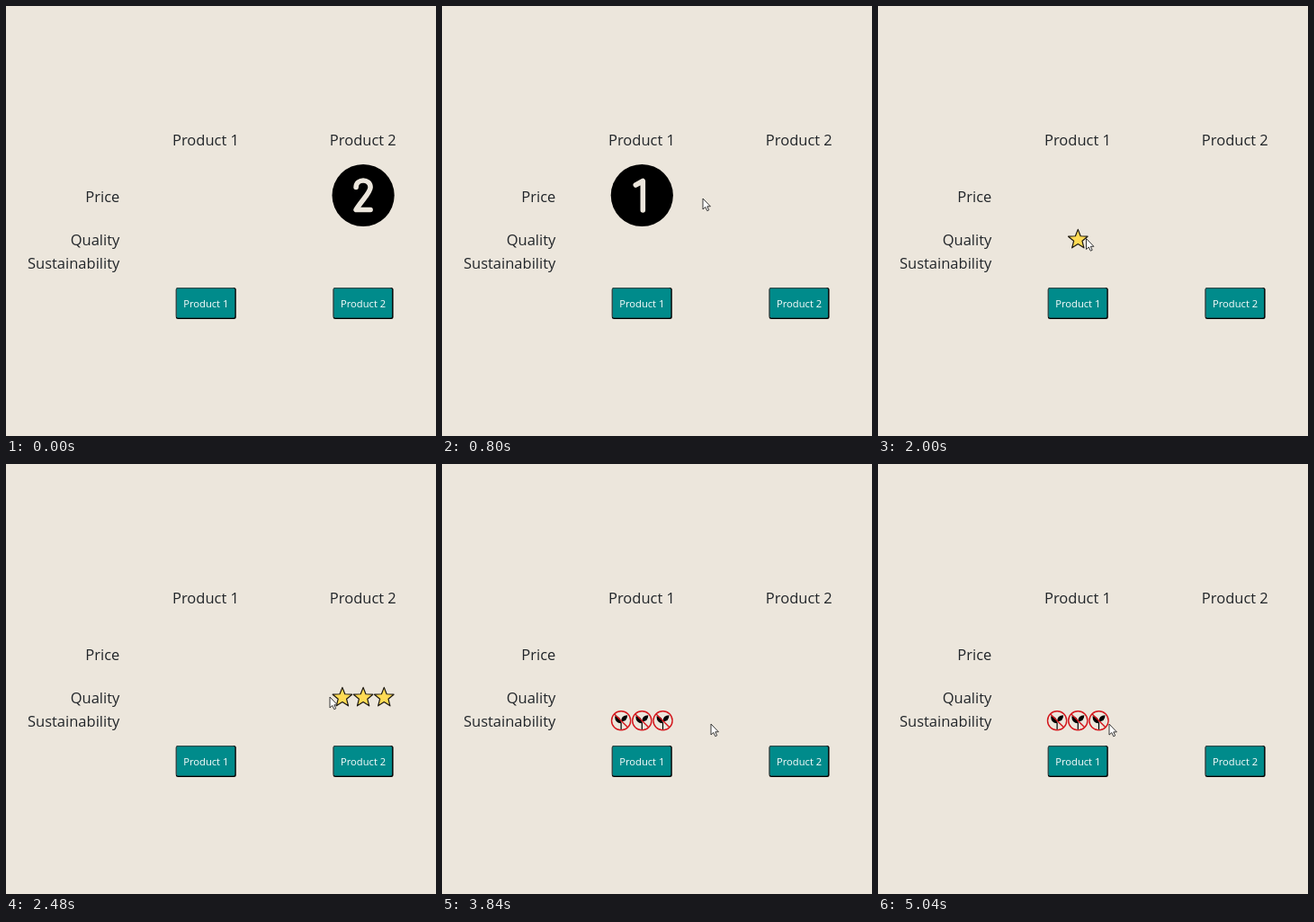
An HTML page for the animation above (5120 ms loop, 478 by 478 pixels).

```html
<!DOCTYPE html>
<html lang="en">
<head>
<meta charset="utf-8">
<style>
  html, body { margin: 0; width: 100%; height: 100%; overflow: hidden; background: #ece6dc; }
  svg { display: block; width: 100vw; height: 100vh; }
  text { font: 16.5px "Open Sans", "Noto Sans", sans-serif; fill: #212529; text-anchor: middle; }
  .label { text-anchor: end; }
  .caption { font-size: 11.2px; fill: #fff; }
  .digit { fill: none; stroke: #ece6dc; stroke-width: 5.6; stroke-linecap: round; stroke-linejoin: round; }
  .ban { fill: none; stroke: #d3151b; stroke-width: 1.4; }
</style>
</head>
<body>
<svg viewBox="0 0 478 478">
  <defs>
    <path id="star" fill="#ffdb55" stroke="#1c1810" stroke-width="1.2" stroke-linejoin="round"/>
    <g id="seedling">
      <path d="M0 10V2" stroke="#000" stroke-width="1.2"/>
      <path d="M0 3Q-7 3-7-5Q0-5 0 3ZM0 1Q0-6 7-6Q7 1 0 1Z"/>
    </g>
    <g id="banned">
      <use href="#seedling"/>
      <path class="ban" d="M-7.4-7.4L7.4 7.4"/>
      <circle class="ban" r="10.6"/>
    </g>
    <g id="button">
      <rect x="-33.5" y="313" width="67" height="35" rx="2.5"/>
      <rect x="-33.5" y="313" width="65.5" height="33.5" rx="2.5" fill="#2f4c4c"/>
      <rect x="-32.3" y="314.2" width="64.3" height="32.3" rx="1" fill="#008b8b"/>
    </g>
  </defs>
  <g id="labels"></g>
  <g id="columns"></g>
  <path id="cursor" d="M0 0V12L2.8 9.5L4.8 13.7L6.7 12.8L4.8 8.8H8.4Z" fill="#fff" stroke="#222" stroke-width=".9"/>
</svg>
<script>
const LOOP = 5120, STEP = 80, ENTER = 80;
const ROWS = { Price: 212, Quality: 260, Sustainability: 286 };
const byId = id => document.getElementById(id);

// Places the pointer passes: time, x, y
const stops = [
  [ENTER, 452, 207], [480, 405, 214], [800, 290, 214], [1600, 229, 246], [2080, 232, 261],
  [2480, 360, 259], [3040, 373, 268], [3600, 374, 285], [3840, 299, 289], [4320, 239, 290],
  [LOOP, 259, 289]
];

const price = d =>
  `<g transform="translate(0 210.5)"><circle r="34.6"/><path class="digit" d="${d}"/></g>`;
const icons = (name, y, count) => Array.from({ length: count }, (_, i) =>
  `<use href="#${name}" x="${(i - (count - 1) / 2) * 23.2}" y="${y}"/>`).join("");

const cells = [
  [price("M-7-11.5L1-16V16.5"), icons("star", 259.7, 1), icons("banned", 285.3, 3)],
  [price("M-8-9C-8-19 8-19 8-9C8-3-2 6-8 16H8"), icons("star", 259.7, 3), icons("seedling", 285.3, 3)]
];

byId("star").setAttribute("d", "M" + Array.from({ length: 10 }, (_, i) => {
  const r = i % 2 ? 4.9 : 11.3, a = i * Math.PI / 5;
  return [r * Math.sin(a), -r * Math.cos(a)].map(v => v.toFixed(2));
}).join("L") + "Z");

byId("labels").innerHTML = Object.entries(ROWS).map(([name, y]) =>
  `<text class="label" x="126.3" y="${y + 6}">${name}</text>`).join("");

byId("columns").innerHTML = cells.map((rows, c) => `
  <g transform="translate(${222.3 + c * 174.8} 0)">
    <text x="-.3" y="155">Product ${c + 1}</text>
    <use href="#button"/>
    <text class="caption" y="334.7">Product ${c + 1}</text>
    ${rows.map((cell, r) => `<g id="cell${c}${r}">${cell}</g>`).join("")}
  </g>`).join("");

function pointerAt(t) {
  const i = Math.max(1, stops.findIndex(s => s[0] > t));
  const [t0, x0, y0] = stops[i - 1], [t1, x1, y1] = stops[i];
  const k = Math.max(0, (t - t0) / (t1 - t0));
  return [x0 + (x1 - x0) * k, y0 + (y1 - y0) * k];
}

// Only the cell under the pointer shows its content.
function draw(now) {
  const t = Math.floor(now % LOOP / STEP) * STEP;
  const [x, y] = pointerAt(t);
  const open = `cell${x < 310 ? 0 : 1}${y < 248 ? 0 : y < 272 ? 1 : 2}`;
  cells.forEach((rows, c) => rows.forEach((_, r) => {
    const id = `cell${c}${r}`;
    byId(id).style.display = id === open ? "" : "none";
  }));
  byId("cursor").style.display = t < ENTER ? "none" : "";
  byId("cursor").setAttribute("transform", `translate(${x} ${y})`);
}

const start = performance.now();
function tick() {
  draw(performance.now() - start);
  requestAnimationFrame(tick);
}
tick();
</script>
</body>
</html>
```
